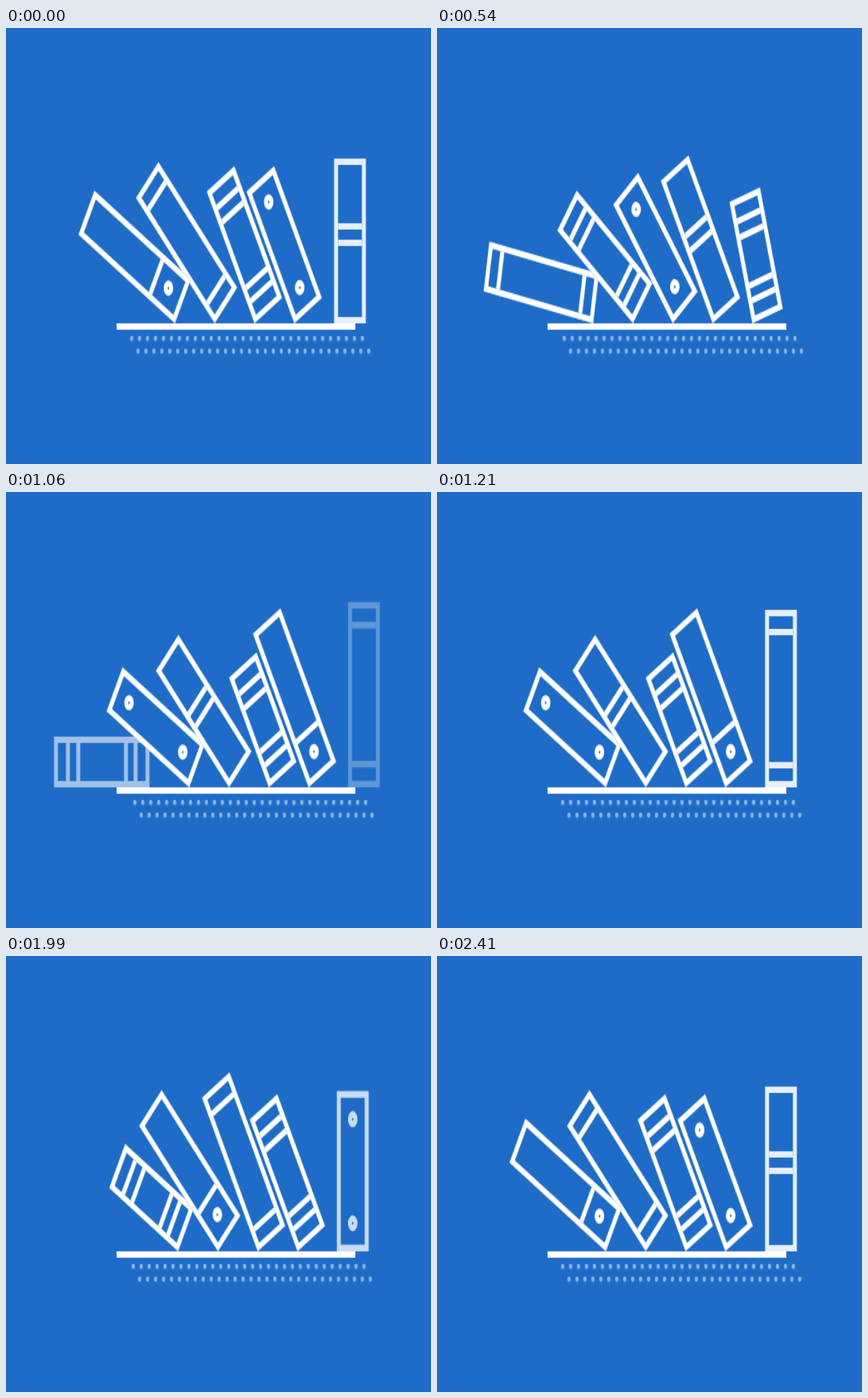
Recreate the animation shown at these times as an HTML page with a canvas. Size 620 by 635 pixels, loop 2.51 s.

```html
<!DOCTYPE html>
<html lang="en">
<head>
<meta charset="utf-8">
<title>Bookshelf loader</title>
<style>
  html, body { margin: 0; width: 100%; height: 100%; overflow: hidden; background: #1e6cc7; }
  canvas { display: block; width: 620.6px; height: 635px; }
</style>
</head>
<body>
<canvas id="stage" width="535" height="344"></canvas>
<script>
const canvas = document.getElementById('stage');
const ctx = canvas.getContext('2d');
const BLUE = '#1e6cc7', WHITE = '#fff';
const SHELF = { x: 139, y: 233, w: 300, h: 5 };
const THICK = 5, WIDTH = 40;
const LOOP = 2510, START_PHASE = 58.9;

// How long each pose is held (ms); the last one fills the rest of the loop.
const HOLDS = [120, 120, 150, 150, 120, 120, 130, 150, 150,
  120, 120, 120, 150, 120, 150, 150, 120, 150];

// Marks are measured from the top; mirrored books repeat them at the bottom.
const BOOKS = [
  { h: 140, bars: [15], mirror: true },
  { h: 120, bars: [15, 27.5], mirror: true },
  { h: 120, rings: [21], mirror: true },
  { h: 130, bars: [51, 63.5] },
  { h: 100, bars: [15, 27.5], mirror: true },
  { h: 140, bars: [99], rings: [119] }
];

const ramp = (v, from, to) => Math.min(1, Math.max(0, (v - from) / (to - from)));

// Percent of a full trip: one percent per started 25 ms of each finished hold.
function progress(t) {
  let sum = 0;
  for (const hold of HOLDS) {
    if (t < hold) return sum;
    t -= hold;
    sum += Math.ceil(hold / 25);
  }
  return 0;
}

// Pose of a book after p percent of its trip: hop in, tip over in stages, fade.
function pose(p) {
  const hop = 0.1 * (ramp(p, 0, 6.5) - ramp(p, 6.5, 8.8));
  return {
    x: SHELF.w - 3 * p - 10 * hop,
    stretch: 1 + hop,
    angle: 30 * ramp(p, 10, 17.6) + 15 * ramp(p, 45, 49.5)
      + 15 * ramp(p, 61.5, 67) + 30 * ramp(p, 76, 83.5),
    alpha: ramp(p, 0, 10) - ramp(p, 83.5, 90)
  };
}

function bar(y) {
  ctx.fillRect(THICK, Math.ceil(y), WIDTH - 2 * THICK, THICK);
}

function ring(y) {
  ctx.beginPath();
  ctx.arc(WIDTH / 2, y, 3.5, 0, Math.PI * 2);
  ctx.stroke();
}

function drawBook({ h, bars = [], rings = [], mirror }, p) {
  const { x, stretch, angle, alpha } = pose(p);
  ctx.save();
  ctx.globalAlpha = alpha;
  ctx.translate(SHELF.x + x, SHELF.y);
  ctx.rotate(-angle * Math.PI / 180);
  ctx.scale(1, stretch);
  ctx.translate(0, -h);
  ctx.fillStyle = BLUE;
  ctx.fillRect(0, 0, WIDTH, h);
  ctx.strokeStyle = ctx.fillStyle = WHITE;
  ctx.lineWidth = THICK;
  ctx.strokeRect(THICK / 2, THICK / 2, WIDTH - THICK, h - THICK);
  for (const y of bars) {
    bar(y);
    if (mirror) bar(h - THICK - y);
  }
  for (const y of rings) {
    ring(y);
    if (mirror) ring(h - y);
  }
  ctx.restore();
}

function drawDots(x, y, shift) {
  ctx.save();
  ctx.beginPath();
  ctx.rect(x, y, SHELF.w, SHELF.h);
  ctx.clip();
  ctx.fillStyle = BLUE;
  ctx.fillRect(x, y, SHELF.w, SHELF.h);
  ctx.fillStyle = 'rgba(255,255,255,.5)';
  for (let dx = shift - 5; dx < SHELF.w + 5; dx += 10) {
    ctx.beginPath();
    ctx.arc(x + dx, y + 2, 2.12, 0, Math.PI * 2);
    ctx.fill();
  }
  ctx.restore();
}

function draw(ms) {
  const phase = START_PHASE + progress(ms % LOOP);
  ctx.fillStyle = BLUE;
  ctx.fillRect(0, 0, canvas.width, canvas.height);
  BOOKS.forEach((book, i) => drawBook(book, (phase - i * 100 / 6 + 100) % 100));
  ctx.fillStyle = WHITE;
  ctx.fillRect(SHELF.x, SHELF.y, SHELF.w, SHELF.h);
  drawDots(SHELF.x + 15, SHELF.y + 10, phase % 10);
  drawDots(SHELF.x + 23, SHELF.y + 20, phase % 10);
}

const start = performance.now();
function tick(now) {
  draw(Math.max(0, now - start));
  requestAnimationFrame(tick);
}
tick(start);
</script>
</body>
</html>
```
